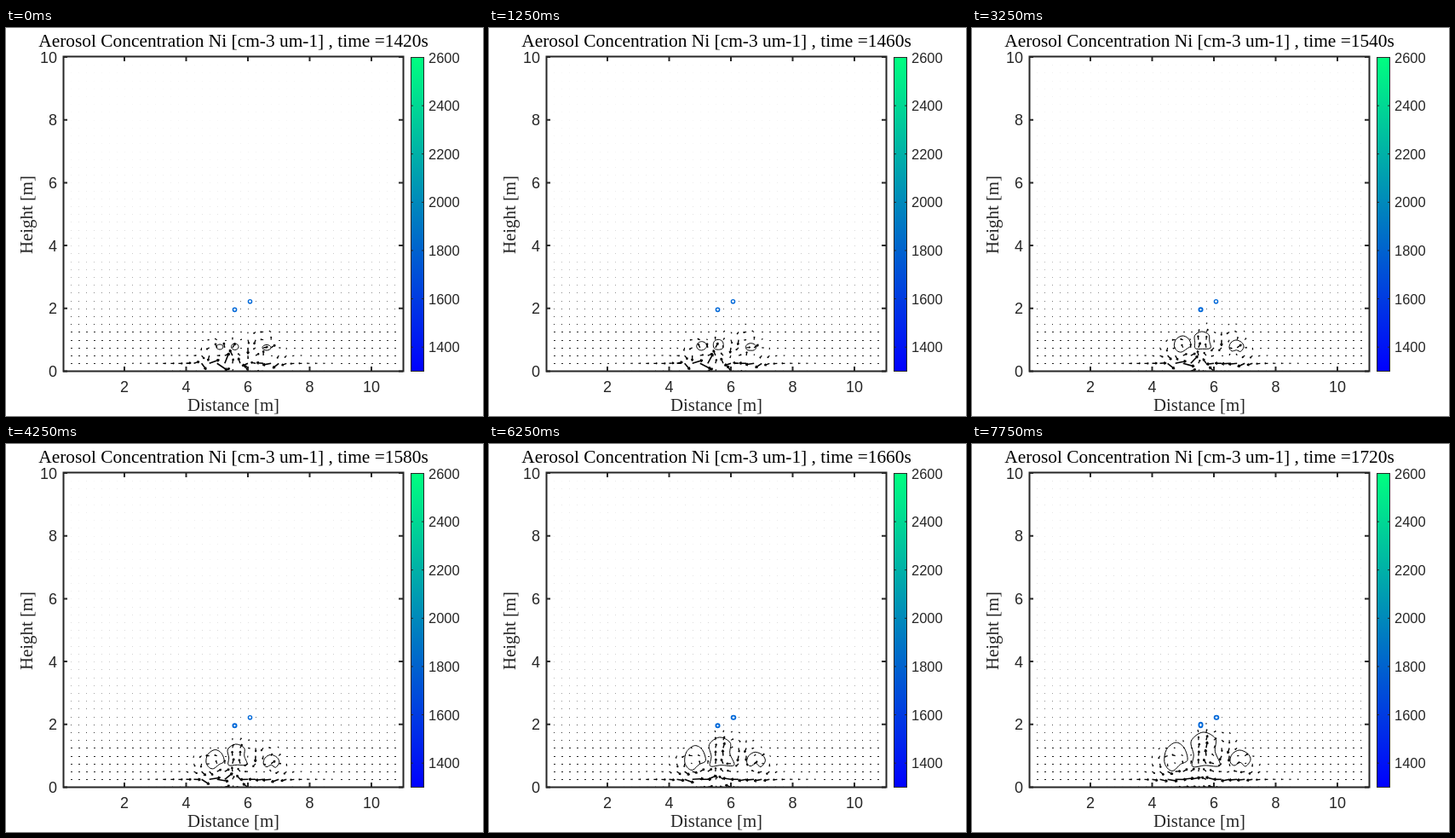
An HTML page with a canvas that plays this animation: 560 px wide and 455 px high, repeating every 8 s.

```html
<!DOCTYPE html>
<html lang="en">
<head>
<meta charset="utf-8">
<title>Aerosol concentration</title>
<style>
html, body { margin: 0; width: 100%; height: 100%; overflow: hidden; background: #fff; }
canvas, svg { position: absolute; left: 0; top: 0; }
text { fill: #262626; font: 18px "Liberation Sans", Arial, sans-serif; text-anchor: middle; }
.label { font: 20.8px "Liberation Serif", "Times New Roman", serif; }
#title { fill: #000; font-size: 21.4px; }
.end { text-anchor: end; }
.bar { font-size: 16.5px; text-anchor: start; }
path, rect { stroke: #262626; fill: none; }
</style>
</head>
<body>
<canvas id="plot" width="560" height="455"></canvas>
<svg id="axes" width="560" height="455">
  <defs>
    <linearGradient id="winter" x1="0" y1="0" x2="0" y2="1">
      <stop offset="0" stop-color="#00ff80"/>
      <stop offset="1" stop-color="#0000ff"/>
    </linearGradient>
  </defs>
  <rect x="67.5" y="33.5" width="399" height="369" stroke-width="2"/>
  <rect x="475.5" y="34.5" width="15" height="368" style="fill:url(#winter)"/>
  <text id="title" class="label" x="267" y="22"></text>
  <text class="label" x="267" y="449">Distance [m]</text>
  <text class="label" transform="translate(31 219) rotate(-90)">Height [m]</text>
</svg>
<script>
const svg = document.getElementById('axes');
const title = document.getElementById('title');
const ctx = document.getElementById('plot').getContext('2d');
const X = m => 66.5 + 36.25 * m;
const Y = m => 402.5 - 36.85 * m;
const mix = (a, b, k) => a + (b - a) * k;
const hash = (i, j) => {
  const s = Math.sin(i * 127.1 + j * 311.7) * 43758.5453;
  return s - Math.floor(s);
};

function add(tag, attrs, text = '') {
  const el = document.createElementNS('http://www.w3.org/2000/svg', tag);
  for (const k in attrs) el.setAttribute(k, attrs[k]);
  el.textContent = text;
  svg.append(el);
}

let ticks = '';
for (let m = 0; m <= 10; m += 2) {
  const x = X(m), y = Y(m);
  if (m) {
    ticks += `M${x} 402v-5M${x} 34v5`;
    add('text', { x, y: 427 }, m);
  }
  ticks += `M67 ${y}h5M466 ${y}h-5`;
  add('text', { x: 60, y: y + 6.5, class: 'end' }, m);
}
add('path', { d: ticks, 'stroke-width': 2 });
for (let c = 1400; c <= 2600; c += 200) {
  const y = mix(402.5, 34.5, (c - 1300) / 1300);
  add('path', { d: `M475 ${y}h3M491 ${y}h-3` });
  add('text', { x: 496, y: y + 6, class: 'bar' }, c);
}

// Each plume: bounding boxes (left, top, right, bottom) at steps 0, 12, 30
// and the outline it grows into, clockwise from the top.
const plumes = [
  { boxes: [[247, 371, 255, 377], [237, 361, 257, 380], [225, 350, 253, 383]],
    shape: [[.5, 0], [.85, .18], [1, .62], [.7, .78], [.42, 1], [.2, .95], [.03, .68], [.12, .25]] },
  { boxes: [[264.5, 370, 273, 377.5], [260, 356, 281, 377], [256, 338, 291, 379]],
    shape: [[.43, 0], [.85, .18], [.84, .55], [1, .95], [.5, .95], [.08, .98], [.12, .65], [.04, .25]] },
  { boxes: [[301, 371.5, 311, 378], [302, 366, 319, 380], [303, 359, 327, 378]],
    shape: [[.45, 0], [.85, .2], [1, .6], [.75, 1], [.5, .76], [.2, .95], [0, .7], [.1, .25]] }
];

function drawPlume({ boxes, shape }, n) {
  const late = n > 12 ? 1 : 0;
  const k = late ? (n - 12) / 18 : n / 12;
  const [l, t, r, b] = boxes[late].map((v, i) => mix(v, boxes[late + 1][i], k));
  const m = Math.min(1, n / 18);
  const pts = shape.map(([u, v], i) => {
    const a = i * Math.PI / 4;
    return [mix(l, r, mix(.5 + .5 * Math.sin(a), u, m)),
            mix(t, b, mix(.5 - .5 * Math.cos(a), v, m))];
  });
  const at = i => pts[(i + 8) % 8];
  ctx.beginPath();
  ctx.moveTo(...pts[0]);
  for (let i = 0; i < 8; i++) {
    const [p, q, s, w] = [at(i - 1), at(i), at(i + 1), at(i + 2)];
    ctx.bezierCurveTo(q[0] + (s[0] - p[0]) / 6, q[1] + (s[1] - p[1]) / 6,
                      s[0] - (w[0] - q[0]) / 6, s[1] - (w[1] - q[1]) / 6, ...s);
  }
  ctx.lineWidth = 1;
  ctx.stroke();
}

// Divergence-free jet around (cx, cy): strong core, curling edges.
function jet(x, y, cx, cy, angle, size, power) {
  const dx = x - cx, dy = y - cy, c = Math.cos(angle), s = Math.sin(angle);
  const a = (dx * c + dy * s) / size, b = (dy * c - dx * s) / size;
  const e = power * Math.exp(-(a * a + b * b) / 2);
  const va = e * (1 - b * b), vb = e * a * b;
  return [va * c - vb * s, va * s + vb * c];
}

function wind(x, y, i, j, p) {
  const dx = 268 - x, h = 402.5 - y;
  let u = Math.sign(dx) * Math.min(1, Math.abs(dx) / 12) *
    (7 * Math.exp(-dx * dx / 6000 - (h - 9) ** 2 / 60) +
     3 * Math.exp(-Math.abs(dx) / 130 - h / 45));
  let v = 0;
  for (const g of [
    jet(x, y, mix(251, 242, p), mix(377, 370, p), -2.3, mix(11, 14, p), 9),
    jet(x, y, mix(268, 271, p), mix(378, 364, p), -1.5, mix(12, 18, p), 11),
    jet(x, y, mix(306, 314, p), mix(378, 371, p), -.75, 11, 8),
    jet(x, y, 289, 388, -.5, 10, mix(8, 4, p))
  ]) { u += g[0]; v += g[1]; }
  const near = Math.exp(-Math.pow((dx + 2) / 50, 4) - Math.pow((h - 15) / 22, 4));
  const turn = (hash(i, j) - .5) * 2.4 * (1 - p) * near;
  const c = Math.cos(turn), s = Math.sin(turn);
  return [u * c - v * s, u * s + v * c];
}

function arrow(x, y, u, v, len) {
  const a = Math.atan2(v, u), tip = Math.min(3, len * .4);
  const tx = x + u, ty = y + v;
  ctx.lineWidth = Math.min(1.6, .9 + len * .08);
  ctx.beginPath();
  ctx.moveTo(x, y);
  ctx.lineTo(tx, ty);
  for (const side of [-.45, .45]) {
    ctx.moveTo(tx, ty);
    ctx.lineTo(tx - tip * Math.cos(a + side), ty - tip * Math.sin(a + side));
  }
  ctx.stroke();
}

function drawField(n) {
  const p = n / 30;
  for (let j = 0; j < 40; j++) for (let i = 1; i < 44; i++) {
    const x = X(i / 4), y = Y(j / 4), h = 402.5 - y;
    const [u, v] = wind(x, y, i, j, p);
    const len = Math.hypot(u, v);
    if (len > 1.5) {
      arrow(x, y, u, v, len);
      continue;
    }
    const low = h < 60 ? .8 : .75 * Math.exp((60 - h) / 55);
    ctx.globalAlpha = Math.min(.9, low + (.02 + .05 * p) * (.5 + hash(i, j)));
    ctx.fillRect(Math.round(x), Math.round(y), h < 55 ? 2 : 1, 1);
    ctx.globalAlpha = 1;
  }
}

function ring(x, y, rx, ry, width) {
  ctx.lineWidth = width;
  ctx.beginPath();
  ctx.ellipse(x, y, rx, ry, 0, 0, 7);
  ctx.stroke();
}

function draw(n) {
  title.textContent = `Aerosol Concentration Ni [cm-3 um-1] , time =${1420 + 10 * n}s`;
  ctx.clearRect(0, 0, 560, 455);
  ctx.fillStyle = ctx.strokeStyle = '#000';
  ctx.save();
  ctx.beginPath();
  ctx.rect(67, 34, 399, 369);
  ctx.clip();
  drawField(n);
  plumes.forEach(f => drawPlume(f, n));
  ctx.restore();
  ctx.strokeStyle = '#0068d8';
  ring(268.5, n < 26 ? 330.3 : 329.5, 2.1, n < 26 ? 2.1 : 2.7, n < 12 ? 1.5 : 1.9);
  ring(n < 20 ? 286.5 : 287, 320.7, n < 20 ? 2.1 : 2.4, 2.1, n < 20 ? 1.4 : 1.8);
}

let shown = -1;
function tick() {
  const n = Math.max(0, Math.floor(performance.now() % 8000 / 250) - 1);
  if (n !== shown) draw(shown = n);
  requestAnimationFrame(tick);
}
tick();
</script>
</body>
</html>
```
